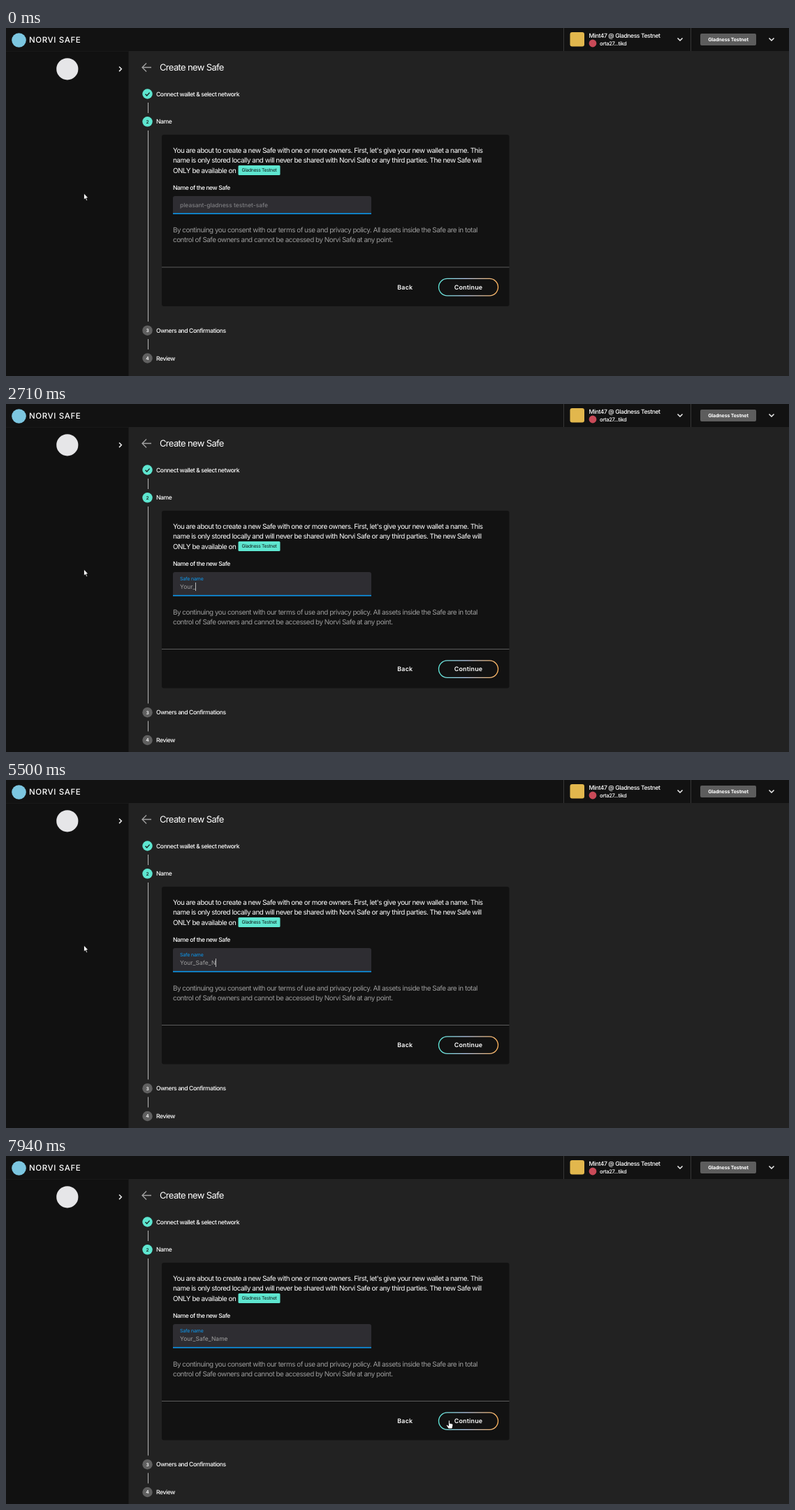
Recreate the animation shown at these times as an HTML page. Size 1121x499 px, loop 8 s.

```html
<!DOCTYPE html>
<html lang="en">
<head>
<meta charset="utf-8">
<title>Create new Safe</title>
<style>
  html, body { margin: 0; width: 100%; height: 100%; overflow: hidden; background: #222; }
  svg { display: block; }
  text { font-family: Inter, "Open Sans", sans-serif; fill: #fff; text-rendering: geometricPrecision; white-space: pre; }
  .brand { font-size: 11.5px; font-weight: 500; letter-spacing: .6px; }
  .title { font-size: 13px; letter-spacing: -.05em; }
  .label { font-size: 8.6px; font-weight: 500; letter-spacing: -.05em; }
  .body { font-size: 9.93px; letter-spacing: -.05em; }
  .note { fill: #9c9c9c; }
  .addr { font-size: 7.7px; font-weight: 500; letter-spacing: -.05em; }
  .net { font-size: 7.05px; font-weight: 700; letter-spacing: -.02em; }
  .chip { font-size: 6.75px; letter-spacing: -.05em; fill: #12201e; }
  .field { font-size: 8.49px; letter-spacing: .005em; fill: #a0a0a0; }
  .hint { font-size: 8.45px; font-weight: 500; letter-spacing: 0; fill: #7d7d80; }
  .float { font-size: 6.95px; letter-spacing: -.02em; fill: #0b9cf5; }
  .btn { font-size: 8.9px; font-weight: 600; letter-spacing: .02em; }
  .num { font-size: 6.6px; font-weight: 600; }
  .mid { text-anchor: middle; }
  .line { stroke: #b4b4b4; stroke-width: 1; }
  .icon { fill: none; stroke: #eee; stroke-width: 1.5; }
</style>
</head>
<body>
<svg width="1121" height="499" viewBox="0 0 1121 499">
  <defs>
    <linearGradient id="rim">
      <stop offset="0" stop-color="#5ee6d8"/>
      <stop offset=".45" stop-color="#bcd0f2"/>
      <stop offset="1" stop-color="#ffb45c"/>
    </linearGradient>
  </defs>

  <rect width="1121" height="499" fill="#222"/>
  <rect width="175.5" height="499" fill="#111"/>
  <rect width="1121" height="33" fill="#121212"/>
  <rect y="33" width="175" height="1" fill="#191919"/>

  <!-- header -->
  <circle cx="18.5" cy="17.5" r="10.3" fill="#7cc6e0"/>
  <text class="brand" x="33" y="21.2">NORVI SAFE</text>
  <path d="M798.5 0V33M980.5 0V33" stroke="#363636"/>
  <rect x="807.5" y="6" width="20.5" height="20.5" rx="3" fill="#e2b74d"/>
  <text class="label" x="834.5" y="14.2">Mint47 @ Gladness Testnet</text>
  <circle cx="840" cy="22" r="5.4" fill="#c94a58"/>
  <text class="addr" x="850" y="24.7">orta27...tikd</text>
  <path class="icon" d="M961.5 14.5L965 18L968.5 14.5M1092.5 14.5L1096 18L1099.5 14.5"/>
  <rect x="994" y="8" width="80" height="17" rx="2" fill="#5d5d5d"/>
  <text class="net mid" x="1034" y="19">Gladness Testnet</text>

  <!-- sidebar -->
  <circle cx="87.8" cy="58.8" r="15.6" fill="#e6e6e8"/>
  <path class="icon" d="M162 55.5L165.300 58.800L162 62.100"/>

  <!-- steps -->
  <path class="icon" style="stroke:#a2a2a2;stroke-width:1.300" d="M208 56.500H195M201 50.500L195 56.500L201 62.500"/>
  <text class="title" x="220" y="61">Create new Safe</text>
  <circle cx="202.500" cy="94.500" r="7.200" fill="#5ee6d0"/>
  <path d="M199.500 94.700L201.700 96.900L205.600 92.600" fill="none" stroke="#16211f" stroke-width="1.400"/>
  <text class="label" x="215" y="97.500">Connect wallet &amp; select network</text>
  <path class="line" d="M203.500 107V122"/>
  <circle cx="202.500" cy="134.300" r="7.200" fill="#5ee6d0"/>
  <text class="num mid" x="202.500" y="136.700" style="fill:#16211f">2</text>
  <text class="label" x="215" y="137.300">Name</text>
  <line class="line" id="rail" x1="203.500" y1="147" x2="203.500" y2="421"/>

  <!-- card -->
  <rect id="card" x="223" y="153" width="497.500" height="246" rx="3" fill="#121212"/>
  <text class="body" x="239" y="179">You are about to create a new Safe with one or more owners. First, let's give your new wallet a name. This</text>
  <text class="body" x="239" y="193.200">name is only stored locally and will never be shared with Norvi Safe or any third parties. The new Safe will</text>
  <text class="body" x="239" y="207.500">ONLY be available on</text>
  <rect x="332.500" y="197" width="60" height="14" rx="1.500" fill="#5ee6d0"/>
  <text class="chip mid" x="362.500" y="206.400">Gladness Testnet</text>
  <text class="label" x="239" y="231.500">Name of the new Safe</text>

  <path id="box" fill="#2e2d32"/>
  <rect id="under" x="239" width="284" height="1.600" fill="#0a94e8"/>
  <text class="field hint" id="hint" x="249" y="257">pleasant-gladness testnet-safe</text>
  <text class="float" id="float" x="249" y="253">Safe name</text>
  <text class="field" id="typed" x="249" y="265.200"></text>
  <rect id="caret" width="1" height="12" fill="#b8b8b8"/>

  <g id="lower">
    <text class="body note" x="239" y="293.100">By continuing you consent with our terms of use and privacy policy. All assets inside the Safe are in total</text>
    <text class="body note" x="239" y="307.300">control of Safe owners and cannot be accessed by Norvi Safe at any point.</text>
    <rect x="223" y="342.500" width="497.500" height="1" fill="#5c5c5c"/>
    <text class="btn mid" x="571.300" y="374.600">Back</text>
    <rect x="619.500" y="359.400" width="85" height="24.400" rx="12.200" fill="none" stroke="url(#rim)" stroke-width="1.300"/>
    <text class="btn mid" x="662" y="374.600">Continue</text>
    <circle cx="202.500" cy="433.700" r="7.200" fill="#606060"/>
    <text class="num mid" x="202.500" y="436.100">3</text>
    <text class="label" x="215" y="436.700">Owners and Confirmations</text>
    <path class="line" d="M203.500 446V461"/>
    <circle cx="202.500" cy="473.500" r="7.200" fill="#606060"/>
    <text class="num mid" x="202.500" y="475.900">4</text>
    <text class="label" x="215" y="476.500">Review</text>
  </g>

  <g id="pointer" fill="#fff" stroke="#000" stroke-width=".7" stroke-linejoin="round">
    <path id="arrow" d="M0 0V9.200L2.100 7.300L3.600 10.700L5 10.100L3.600 6.800H6.400Z"/>
    <path id="hand" d="M-.9 .9a.9 .9 0 0 1 1.800 0V4.300L4.200 5Q5.500 5.400 5.400 6.800L4.600 10.500Q4.400 12 3 12H0Q-1 12 -1.700 11L-4 7.600Q-4 6.400 -2.700 6.600L-.9 8Z"/>
  </g>
</svg>
<script>
const LOOP = 8000;
const NAME = "Your_Safe_Name";
const GROW = 8.5;

// moment at which each letter of NAME appears
const keys = [1590, 1920, 2120, 2250, 2710, 3190, 3320, 3650, 4110, 5100, 5500, 5900, 6040, 6120];
// moments at which the caret is switched, starting hidden
const blinks = [130, 730, 1260, 4640, 5100, 6650, 7180, 7730];

const smooth = p => p * p * (3 - 2 * p);
const easeOut = p => 1 - (1 - p) ** 2;
const easeIn = p => p * p;
const moves = [
  { at: 7050, gap: 70, steps: 5, from: [111.5, 237], to: [504.5, 365], ease: [smooth, smooth] },
  { at: 7530, gap: 68, steps: 7, from: [504.5, 365], to: [634.5, 379], ease: [easeOut, easeIn] }
];

const el = id => document.getElementById(id);
const set = (id, attrs) => {
  for (const k in attrs) el(id).setAttribute(k, attrs[k]);
};
const show = (id, on) => set(id, { visibility: on ? "visible" : "hidden" });

// the pointer advances in discrete jumps
function pointerAt(t) {
  const m = t < moves[1].at ? moves[0] : moves[1];
  const step = Math.floor((t - m.at) / m.gap) + 1;
  const p = Math.min(Math.max(step, 0), m.steps) / m.steps;
  return m.from.map((a, i) => a + (m.to[i] - a) * m.ease[i](p));
}

function drawField(t) {
  const count = keys.filter(k => k <= t).length;
  const open = count > 0;
  const grow = open ? GROW : 0;
  const bottom = 267 + grow;

  el("typed").textContent = NAME.slice(0, count);
  show("hint", !open);
  show("float", open);
  set("box", { d: `M239 ${bottom}V244q0-3 3-3H520q3 0 3 3V${bottom}Z` });
  set("under", { y: bottom - 1.6 });
  set("card", { height: 246 + grow });
  set("rail", { y2: 421 + grow });
  set("lower", { transform: `translate(0 ${grow})` });

  const width = open ? el("typed").getComputedTextLength() : 0;
  set("caret", { x: Math.floor(249 + width), y: open ? 256 : 248 });
  show("caret", blinks.filter(b => b <= t).length % 2 === 1);
}

function drawPointer(t) {
  const [x, y] = pointerAt(t);
  const hover = x > 619;
  set("pointer", { transform: `translate(${x} ${y})` });
  show("arrow", !hover);
  show("hand", hover);
}

function frame() {
  const t = performance.now() % LOOP;
  drawField(t);
  drawPointer(t);
  requestAnimationFrame(frame);
}
frame();
</script>
</body>
</html>
```
